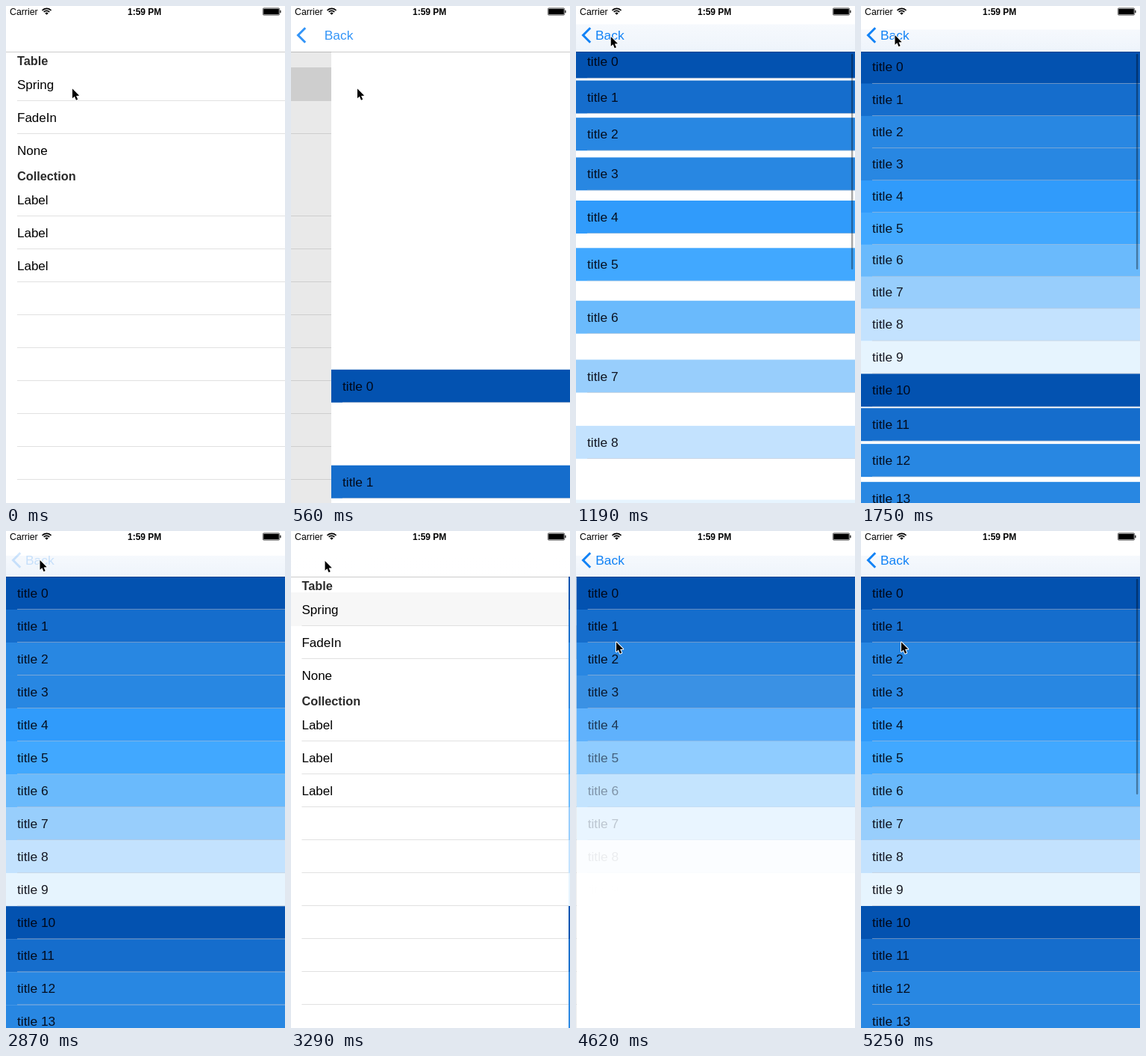
Animation, 374 px wide and 664 px high, one loop 5.32 s. Source, as an HTML page with a canvas:

```html
<!DOCTYPE html>
<html lang="en">
<head>
<meta charset="utf-8">
<title>Table transitions</title>
<style>
html, body { margin: 0; width: 100%; height: 100%; overflow: hidden; background: #fff; }
canvas { display: block; width: 374px; height: 664px; }
</style>
</head>
<body>
<canvas id="stage"></canvas>
<script>
const W = 374, H = 664, LOOP = 5320, STEP = 70;
const NAV = 61, ROW = 44, PAD = 15, ROWS = 14;
const FONT = '"Liberation Sans", Arial, sans-serif';
const BLUE = '#1283f6';
const SHADES = ['#0352b0', '#156dcc', '#2887e2', '#2887e2', '#309bfb',
                '#41a8ff', '#6abafc', '#98cefc', '#c3e2fe', '#e6f4fe'];
const VISITS = [
  { row: 0, open: 350, press: 2800, close: 2890, spring: true },
  { row: 1, open: 4130, press: Infinity, close: Infinity, spring: false }
];

const canvas = document.getElementById('stage');
const ctx = canvas.getContext('2d');
const ratio = window.devicePixelRatio || 1;
canvas.width = W * ratio;
canvas.height = H * ratio;

const clamp = v => Math.min(1, Math.max(0, v));
const smooth = v => { v = clamp(v); return v * v * (3 - 2 * v); };
const mix = (a, b, p) => a + (b - a) * p;

// Critically damped slide of the navigation transition, 0 to 1.
function settle(ms) {
  if (ms <= 0) return 0;
  const s = ms * 0.0185;
  return 1 - (1 + s) * Math.exp(-s);
}

// Distance left to travel on a spring with damping ratio 0.8.
function springOffset(ms) {
  if (ms <= 0) return 667;
  const a = ms * 0.00341;
  return 667 * Math.exp(-a * 4 / 3) * (Math.cos(a) + 4 / 3 * Math.sin(a));
}

function text(str, x, y, size, color = '#000', weight = 'normal') {
  ctx.font = `${weight} ${size}px ${FONT}`;
  ctx.fillStyle = color;
  ctx.fillText(str, x, y);
}

function rect(x, y, w, h, color) {
  ctx.fillStyle = color;
  ctx.fillRect(x, y, w, h);
}

function faded(alpha, draw) {
  if (alpha <= 0) return;
  ctx.save();
  ctx.globalAlpha *= alpha;
  draw();
  ctx.restore();
}

function drawMenu(row, highlight) {
  rect(0, 0, W, H, '#fff');
  const lines = [126, 170];
  for (let y = 280; y < H; y += ROW) lines.push(y);
  lines.forEach(y => rect(PAD, y, W - PAD, 1, '#e1e1e1'));
  faded(highlight, () => rect(0, 82 + row * ROW, W, ROW + 1, '#e1e1e1'));
  text('Table', PAD, 79, 16.3, '#2b2b2b', 'bold');
  text('Collection', PAD, 233, 16.3, '#2b2b2b', 'bold');
  ['Spring', 'FadeIn', 'None'].forEach((s, i) => text(s, PAD, 111 + i * ROW, 17));
  for (let i = 0; i < 3; i++) text('Label', PAD, 265 + i * ROW, 17);
}

function cellState(visit, i, t) {
  const ms = t - visit.open - 4 - i * 52.5;
  return visit.spring
    ? { offset: springOffset(ms), alpha: 1 }
    : { offset: 0, alpha: smooth(ms / 400) };
}

function drawCell(i, y) {
  rect(0, y, W, ROW, SHADES[i % 10]);
  rect(PAD, y + ROW - 0.5, W - PAD, 0.5, '#c8c7cc');
  text('title ' + i, PAD, y + 28, 17.4, 'rgba(0,0,10,.9)');
}

function drawIndicator(visit, t) {
  const age = t - visit.open;
  const alpha = clamp((age - 500) / 100) * (1 - clamp((age - 1900) / 250));
  faded(alpha, () => {
    ctx.fillStyle = 'rgba(0,0,0,.35)';
    ctx.beginPath();
    ctx.roundRect(368.9, 64, 2.5, 288, 1.2);
    ctx.fill();
  });
}

// Upper rows overlap lower ones, so rows are painted from the bottom up.
function drawTable(visit, t) {
  rect(0, 0, W, H, '#fff');
  for (let i = ROWS - 1; i >= 0; i--) {
    const { offset, alpha } = cellState(visit, i, t);
    const y = NAV + i * ROW + offset;
    if (y < H) faded(alpha, () => drawCell(i, y));
  }
  drawIndicator(visit, t);
}

// Pale tint where the first row shows through the bar.
function drawTint(visit, t, shown) {
  const { offset, alpha } = cellState(visit, 0, t);
  const top = 33 + Math.min(0, offset);
  const fill = ctx.createLinearGradient(0, top, 0, NAV);
  fill.addColorStop(0, '#f6f9fd');
  fill.addColorStop(1, '#eef4fb');
  faded(shown * alpha * clamp(1 - offset / 40), () => rect(0, top, W, NAV - top, fill));
}

function drawBack(shown) {
  faded(shown, () => {
    ctx.strokeStyle = BLUE;
    ctx.lineWidth = 3;
    ctx.beginPath();
    ctx.moveTo(19.2, 29.3);
    ctx.lineTo(9.5, 39);
    ctx.lineTo(19.2, 48.7);
    ctx.stroke();
    text('Back', mix(156, 26, shown), 45, 17.4, BLUE);
  });
}

function drawBar(visit, t, shown) {
  rect(0, 0, W, NAV, '#fff');
  if (visit) {
    drawTint(visit, t, shown);
    faded(t >= visit.press ? 0.2 : 1, () => drawBack(shown));
  }
  rect(0, NAV, W, 1, 'rgba(0,0,0,.2)');
}

function drawStatus() {
  text('Carrier', 5, 12, 12.3);
  text('1:59 PM', 163, 12, 12, '#000', 'bold');
  ctx.strokeStyle = '#000';
  ctx.lineWidth = 1.7;
  [8.2, 5.2].forEach(r => {
    ctx.beginPath();
    ctx.arc(54.5, 11.6, r, -Math.PI * 0.76, -Math.PI * 0.24);
    ctx.stroke();
  });
  ctx.fillStyle = '#000';
  ctx.beginPath();
  ctx.moveTo(54.5, 11.8);
  ctx.arc(54.5, 11.8, 3, -Math.PI * 0.76, -Math.PI * 0.24);
  ctx.fill();
  ctx.lineWidth = 0.6;
  ctx.beginPath();
  ctx.roundRect(344.3, 2.8, 22.4, 9.4, 1.5);
  ctx.stroke();
  rect(345.2, 3.7, 20.6, 7.6, '#000');
  rect(367.3, 5.8, 1.2, 3.4, '#000');
}

function drawCursor(t) {
  const toBack = smooth((t - 880) / 345);
  const toRow = smooth((t - 3262) / 518);
  const x = mix(mix(89, 45.5, toBack), 54, toRow);
  const y = mix(mix(110.5, 39, toBack), 148.5, toRow);
  ctx.save();
  ctx.translate(x, y);
  ctx.beginPath();
  [[0, 0], [0, 12.8], [2.9, 10.2], [5, 15.2], [7.2, 14.3], [5.1, 9.5], [9.2, 9.3]]
    .forEach(p => ctx.lineTo(...p));
  ctx.closePath();
  ctx.lineJoin = 'round';
  ctx.strokeStyle = '#fff';
  ctx.lineWidth = 2;
  ctx.stroke();
  ctx.fillStyle = '#000';
  ctx.fill();
  ctx.restore();
}

function render(t) {
  ctx.setTransform(ratio, 0, 0, ratio, 0, 0);
  const visit = VISITS.filter(v => t >= v.open).pop();
  let shown = 0, highlight = 0;
  if (visit) {
    shown = settle(t - visit.open - 25) * (1 - settle(t - visit.close));
    highlight = 1 - smooth((t - visit.close) / 600);
  }

  ctx.save();
  ctx.translate(-112 * shown, 0);
  drawMenu(visit ? visit.row : 0, highlight);
  ctx.restore();

  if (shown > 0) {
    rect(0, 0, W, H, `rgba(0,0,0,${0.1 * shown})`);
    ctx.save();
    ctx.translate(W * (1 - shown), 0);
    drawTable(visit, t);
    ctx.restore();
  }
  drawBar(visit, t, shown);
  drawStatus();
  drawCursor(t);
}

const start = performance.now();
function tick() {
  const t = (performance.now() - start) % LOOP;
  render(Math.floor(t / STEP) * STEP);
  requestAnimationFrame(tick);
}
tick();
</script>
</body>
</html>
```
